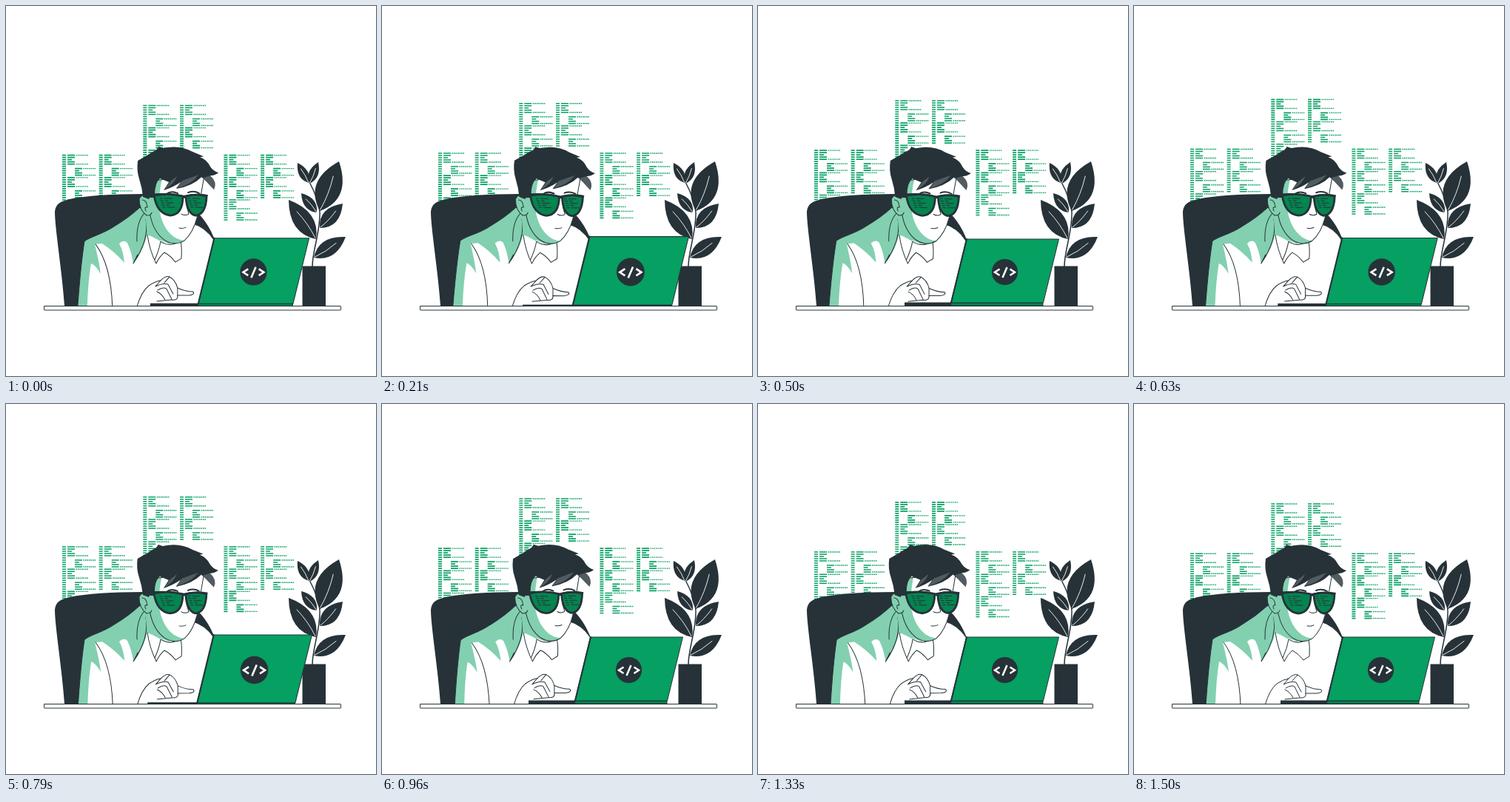
Write an HTML page that moves like this. It is 500 px wide and 500 px high and loops after 1.54 s.

```html
<!DOCTYPE html>
<html lang="en">
<head>
<meta charset="utf-8">
<title>Coder at a laptop</title>
<style>
  html, body { margin: 0; width: 100%; height: 100%; overflow: hidden; background: #fff; }
  svg { display: block; width: 100%; height: 100%; }
  .ink { fill: #263238; }
  .green { fill: #05a062; }
  .deep { fill: #058450; }
  .shade { fill: #82d0b0; }
  .white { fill: #fff; }
  .hair { fill: #515b60; }
  .line { stroke: #263238; stroke-linecap: round; stroke-linejoin: round; }
  .open { fill: none; }
  .vein { fill: none; stroke: #fff; stroke-width: .9; stroke-linecap: round; }
  .code { fill: none; stroke: #05a062; stroke-width: 1.6; }
  .dots { stroke-dasharray: 1.6 .9; stroke-width: 1.4; }
</style>
</head>
<body>
<svg viewBox="0 0 500 500">
  <defs>
    <g id="snippet">
      <path class="code" id="bars"/>
      <path class="code dots" id="dots"/>
    </g>
    <g id="listing">
      <use href="#snippet"/><use href="#snippet" y="30.2"/><use href="#snippet" y="60.4"/>
      <use href="#snippet" x="49.7"/><use href="#snippet" x="49.7" y="30.2"/>
    </g>
    <path id="face" d="M198 236Q192 262 195 284Q200 306 214 316Q228 325 241 317Q253 306 258 286L268 228Z"/>
    <clipPath id="inFace"><use href="#face"/></clipPath>
  </defs>

  <g id="code">
    <use href="#listing" x="76" y="202.2"/>
    <use href="#listing" x="185.3" y="135"/>
    <use href="#listing" x="294.4" y="202.2"/>
  </g>

  <path class="ink" d="M79 405C76 360 66 300 66 278C67 267 74 264 86 261Q120 254 185 254C240 254 268 278 283 318L200 405Z"/>

  <path class="open line" stroke-width="1.5" d="M414 352C414 330 425 305 424 278Q422 260 409 236"/>
  <path class="ink" id="leaves"/>
  <path class="vein" id="veins"/>
  <rect class="ink" x="400.5" y="351.5" width="31.5" height="54"/>

  <g id="person">
    <path class="shade line" d="M97 407Q101 350 106 318C115 311 130 309 146 298Q166 286 181 272L240 312L252 294Q270 299 281 316L262 407Z"/>
    <path class="white" d="M110 407Q111 372 115 348Q121 350 128 362Q126 346 120 322L130 321Q147 332 160 347Q159 332 153 321Q159 315 164 320Q170 333 172 348Q186 330 191 308L240 312L252 294Q270 299 281 316L262 407Z"/>
    <path class="open line" d="M121 322Q142 350 144 407M187 280Q176 292 177 318M189 288Q194 316 172 348L178 336M252 294Q270 299 281 316"/>
    <path class="shade" d="M187 272L191 309L222 322L205 285Z"/>
    <path class="white line" d="M191 309Q194 330 203 348Q207 339 214 333Q222 337 229 346L237 341Q238 328 236 317Q222 327 209 318Q207 330 201 343"/>
    <path class="shade" d="M191 282V308L209 318L206 292Z"/>

    <use class="shade" href="#face"/>
    <g clip-path="url(#inFace)"><use class="white" href="#face" x="13" y="-4"/></g>
    <use class="open line" href="#face"/>
    <path class="shade line" d="M195 258Q184 252 180 261Q180 276 190 283Q196 283 197 279"/>
    <path class="open line" d="M184 262Q190 262 191 272Q186 271 189 277M244 270L247 281Q242 284 237 281M234 300Q239 301 243 299"/>
    <path class="open line" stroke-width="2" d="M217 254Q223 249 232 253M246 252Q254 249 261 253"/>

    <path class="ink" d="M185 258Q184 246 180 234Q176 222 178 209L192 201L198 197Q204 195 206 190L212 192Q235 187 252 197L267 203L262 204Q271 207 276 217Q280 223 287 225Q282 229 276 229L270 236L264 231Q252 243 230 247L236 238Q226 245 213 249L220 238L208 233Q201 239 201 255Q195 256 193 261Z"/>
    <path class="hair" d="M260 228Q250 242 230 246L238 236ZM231 230Q227 241 214 248L222 237ZM266 232Q275 242 281 248Q286 238 276 229Z"/>

    <path class="ink" d="M193 254Q218 251 240 256Q257 252 273 255L271 260L195 259Z"/>
    <path class="deep line" stroke-width="2.8" d="M200 256Q220 252 239 257Q239 282 222 283Q204 281 200 256ZM243 257Q258 253 271 257Q270 282 256 283Q244 280 243 257Z"/>
    <path class="open line" id="reflection"/>

    <path class="white line" d="M177 407Q183 386 193 378Q202 372 209 371Q216 364 221 366Q229 370 232 381Q243 386 253 386Q256 390 247 391L232 391Q233 398 224 397L204 399"/>
    <path class="open line" d="M209 371L202 379Q212 374 219 376L226 389M221 366L214 374M205 384Q213 379 217 382L224 396M232 381L232 391M204 386Q211 389 215 397"/>
  </g>

  <g id="laptop">
    <rect class="ink" x="198" y="400.5" width="64" height="4.5"/>
    <rect class="deep line" x="261" y="401" width="124" height="4"/>
    <path class="green line" d="M282 315H406.5L385.5 401H261Z"/>
    <path class="open line" stroke-width="2" d="M282 315L261 401"/>
    <circle class="ink" cx="333.5" cy="359.5" r="17.6"/>
    <path class="open" stroke="#fff" stroke-width="2.5" d="M326.5 355.5L320 359.8L326.5 364M336.500 353L330.500 367M340.500 355.500L347 359.800L340.500 364"/>
  </g>

  <rect class="white line" x="51.500" y="405.500" width="401" height="5.500" rx=".6"/>
</svg>
<script>
  const LOOP = 1540, STEPS = 37;
  const $ = id => document.getElementById(id);
  const setPath = (id, d) => $(id).setAttribute('d', d);

  // Two indented paragraphs beside a gutter; their outer rows trail off in dots.
  function drawSnippet() {
    let bars = '', dots = '';
    for (let row = 0; row < 10; row++) {
      const y = row * 3, upper = row < 5, indent = upper ? 7 : 17;
      bars += `M0 ${y}h5`;
      if (row === 5) continue;
      bars += `M${indent} ${y}h${row % 5 === 2 ? 6 : 10}`;
      if (row === (upper ? 0 : 6) || row === (upper ? 4 : 9)) dots += `M${indent + 11.5} ${y}h16.5`;
    }
    setPath('bars', bars);
    setPath('dots', dots);
  }

  function drawReflection() {
    let d = '';
    for (const x of [208, 246]) {
      for (let row = 0; row < 5; row++) {
        d += `M${x + row} ${260 + row * 3}h3m3 0h${row % 2 ? 4 : 10}`;
      }
    }
    setPath('reflection', d);
  }

  // A leaf from base to tip; fullness is relative to its length.
  function addLeaf(x, y, tipX, tipY, fullness) {
    const dx = tipX - x, dy = tipY - y;
    const at = (along, side) => `${x + dx * along - dy * side} ${y + dy * along + dx * side}`;
    leaves += `M${x} ${y}Q${at(.42, fullness)} ${tipX} ${tipY}Q${at(.42, -fullness)} ${x} ${y}`;
    veins += `M${at(.03, 0)}Q${at(.35, .05)} ${at(.7, 0)}`;
  }
  let leaves = '', veins = '';
  addLeaf(424, 277, 450, 210, .48);
  addLeaf(409, 239, 394, 212, .4);
  addLeaf(410, 240, 422, 211, .4);
  addLeaf(420, 279, 399, 253, .42);
  addLeaf(419, 315, 382, 262, .4);
  addLeaf(424, 300, 455, 267, .45);
  addLeaf(416, 340, 459, 312, .42);
  setPath('leaves', leaves);
  setPath('veins', veins);
  drawSnippet();
  drawReflection();

  // Straight rise from start to peak, straight fall to end.
  const bump = (p, start, peak, end) =>
    Math.max(0, Math.min((p - start) / (peak - start), (end - p) / (end - peak)));

  function draw() {
    const t = performance.now() % LOOP;
    const step = Math.floor((t + 4) / LOOP * STEPS) + 1;
    const p = step % STEPS / STEPS;
    const lift = -10 * bump(p, 0, .5, 1);
    const sway = Math.asin(Math.sin(2 * Math.PI * p)) * 2 / Math.PI;
    const beat = 1 + .11 * (bump(p, 0, .1, .3) + bump(p, .4, .5, .6));
    $('code').setAttribute('transform', `translate(0 ${lift})`);
    $('person').setAttribute('transform', `rotate(${sway} 190 297)`);
    $('laptop').setAttribute('transform', `translate(302 360) scale(${beat}) translate(-302 -360)`);
    requestAnimationFrame(draw);
  }
  draw();
</script>
</body>
</html>
```
